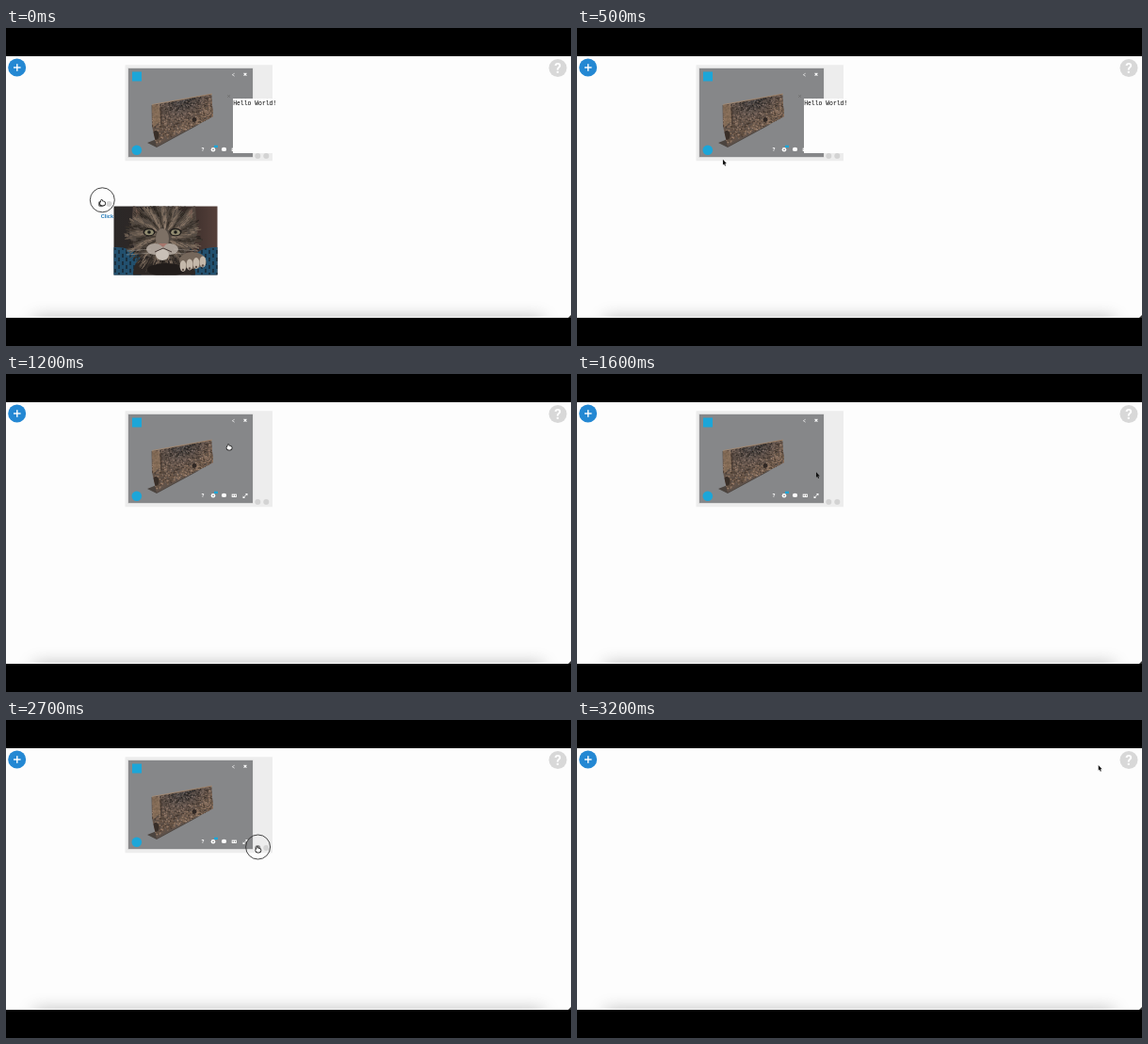
Write an HTML page with a canvas that moves like this. It is 600 px wide and 338 px high and loops after 3300 ms.

```html
<!DOCTYPE html>
<html lang="en">
<head>
<meta charset="utf-8">
<title>Removing board items</title>
<style>
  html, body { margin: 0; width: 100%; height: 100%; overflow: hidden; background: #000; }
  canvas { display: block; width: 600px; height: 338px; }
</style>
</head>
<body>
<canvas id="stage" width="600" height="338"></canvas>
<script>
const LOOP = 3300, STEP = 100;
const PAPER = '#fdfdfd', SKY = '#1ca6d8';
const c = document.getElementById('stage').getContext('2d');

function rect(x, y, w, h, color) {
  c.fillStyle = color;
  c.fillRect(x, y, w, h);
}

function oval(x, y, rx, ry, color) {
  c.fillStyle = color;
  c.beginPath();
  c.ellipse(x, y, rx, ry, 0, 0, 7);
  c.fill();
}

const disc = (x, y, r, color) => oval(x, y, r, r, color);

function trace(points) {
  c.beginPath();
  for (let i = 0; i < points.length; i += 2) c.lineTo(points[i], points[i + 1]);
}

function poly(color, ...points) {
  trace(points);
  c.fillStyle = color;
  c.fill();
}

function line(color, width, ...points) {
  trace(points);
  c.strokeStyle = color;
  c.lineWidth = width;
  c.stroke();
}

function label(text, x, y, font, color, align = 'left') {
  c.font = font;
  c.fillStyle = color;
  c.textAlign = align;
  c.fillText(text, x, y);
}

function cross(x, y, r, color, width) {
  for (const s of [r, -r]) line(color, width, x - r, y - s, x + r, y + s);
}

function clipped(paint, ...points) {
  c.save();
  trace(points);
  c.clip();
  paint();
  c.restore();
}

function random(seed) {
  return () => (seed = seed * 16807 % 2147483647) / 2147483647;
}

function page() {
  rect(0, 0, 600, 338, '#000');
  rect(0, 30, 600, 278, PAPER);
  clipped(() => {
    c.shadowColor = 'rgba(0,0,0,.27)';
    c.shadowBlur = 18;
    rect(30, 308, 540, 30, '#000');
  }, 0, 290, 600, 290, 600, 307, 0, 307);
  poly('#333', 600, 305, 600, 308, 597, 308);

  disc(11.7, 42, 9.5, '#2488d3');
  rect(8, 41.3, 7.6, 1.4, '#fff');
  rect(11.1, 38.2, 1.4, 7.6, '#fff');
  disc(586, 42.5, 9.5, '#d8d8d8');
  label('?', 586, 48, 'bold 15px Roboto, Arial, sans-serif', '#fff', 'center');
}

// Block of weathered stone: u runs along it, v from top to foot
function wall() {
  poly('#4b443f', 150, 122, 160, 118, 206, 102, 160, 127);
  clipped(() => {
    rect(148, 66, 76, 64, '#5f524a');
    const rnd = random(41);
    for (let i = 0; i < 1500; i++) {
      const u = rnd(), v = rnd();
      const cool = Math.exp(-8 * (u - .5) ** 2 - 4 * v * v);
      const light = 22 + rnd() * 34 - cool * 14;
      c.fillStyle = `hsl(${26 - cool * 10} ${20 - cool * 16}% ${light}%)`;
      c.fillRect(155 + u * 65, 81 - u * 11 + v * (43 - u * 19), 1.4, 1.2);
    }
    poly('rgba(150,122,96,.6)', 155, 82, 163, 82, 164, 99, 156, 106);
    oval(159, 114, 3.5, 5, '#382e28');
    disc(200, 97.5, 2.4, '#302824');
  }, 154.5, 82, 218, 70, 220, 94, 160, 126, 155, 104);
  line('#a98a6c', .8, 155, 81.5, 219, 70);
  line('#403229', .8, 164, 84, 165, 102);
}

function viewerIcons() {
  const w = '#fff';
  line(w, .6, 242.7, 48.2, 240.3, 49.7, 242.7, 51.2);
  cross(254, 49.3, 1.4, w, 1.1);
  label('?', 209, 131.4, 'bold 6px Roboto, Arial, sans-serif', w, 'center');
  disc(220, 129.3, 2.3, w);
  disc(220, 129.3, .8, '#777');
  rect(221, 124.7, 4, 2.4, SKY);
  for (const y of [129.6, 128.2]) oval(231.5, y, 2.6, 1.5, w);
  rect(239.7, 127.6, 5.2, 3.4, w);
  for (const x of [241.2, 243.5]) disc(x, 129.2, .7, '#777');
  line(w, .9, 252, 131.5, 256, 127.5);
  for (const s of [1, -1])
    poly(w, 254, 129.5 - 2.4 * s, 254 + 2.4 * s, 129.5 - 2.4 * s, 254 + 2.4 * s, 129.5);
}

function viewer(t) {
  rect(126.5, 39.3, 156.5, 102, '#ededed');
  rect(129.3, 42.3, 133, 95.4, '#d2d2d2');
  rect(130, 43, 132, 94, '#868789');
  wall();
  rect(134, 46.5, 10, 10, SKY);
  disc(138.8, 129.8, 5.3, SKY);
  viewerIcons();
  disc(267.3, 136, 3, t >= 2200 ? '#888' : '#d3d3d3');
  disc(276.3, 136, 3, '#d3d3d3');
}

function note(t) {
  rect(241, 75, 48, 58, PAPER);
  const hover = t >= 800;
  if (hover) rect(234, 69, 5, 7, '#b9b9b9');
  cross(236.6, 72.5, 1.3, hover ? '#111' : '#686868', hover ? 1 : .7);
  label('Hello World!', 241.2, 82, '6.4px "Courier New", "Liberation Mono", monospace', '#000');
}

function fur() {
  const rnd = random(7);
  for (let i = 0; i < 1400; i++) {
    const a = rnd() * 2 * Math.PI, d = 8 + rnd() * 30;
    const dx = Math.cos(a), dy = Math.sin(a);
    const stripe = Math.sin(a * 13 + d * .12);
    const light = 31 + stripe * 13 + rnd() * 12 - d * .25;
    const x = 167 + dx * d, y = 222 + dy * d;
    line(`hsl(28 14% ${light}%)`, 1, x, y, x + dx * 4, y + dy * 4);
  }
}

function cat() {
  disc(101, 187, 3.2, '#777');
  disc(109.5, 187, 3, '#d6d6d6');
  label('Click here', 100.7, 202, 'bold 5.6px Arial, "Liberation Sans", sans-serif', '#2279b8');
  clipped(() => {
    const back = c.createLinearGradient(114, 0, 224, 0);
    back.addColorStop(0, '#2b2827');
    back.addColorStop(.6, '#302624');
    back.addColorStop(1, '#55403a');
    rect(114, 189, 111, 74, back);
    for (const x of [118, 222]) {
      oval(x, 254, 28, 21, '#22506e');
      for (let i = 0; i < 90; i++)
        disc(x - 26 + i % 13 * 4, 235 + Math.floor(i / 13) * 4 + i % 2 * 2, 1, '#172631');
    }
    oval(168, 260, 33, 24, '#2d2724');
    for (const s of [-1, 1]) {
      poly('#51453e', 168 + s * 35, 214, 168 + s * 33, 188, 168 + s * 14, 202);
      poly('#735b50', 168 + s * 30, 205, 168 + s * 30, 192, 168 + s * 19, 201);
    }
    oval(167, 218, 36, 28, '#534a43');
    fur();
    oval(166, 224, 7, 11, '#7d7065');
    for (const s of [-1, 1]) {
      const x = 166 + s * 14;
      oval(x, 217, 6.5, 4.2, '#211e1c');
      oval(x, 217.2, 4.8, 3, '#918b70');
      disc(x, 217, 1.8, '#191a18');
      oval(166 + s * 8, 235, 9, 6, '#aaa097');
      for (const y of [235, 239]) line('#c7beb4', .4, 166 + s * 12, y, 166 + s * 38, y + 2);
    }
    oval(166, 241, 7, 6, '#c9c0b7');
    poly('#a7766c', 162, 229, 171, 229, 167, 233);
    line('#463a36', 1, 158, 238, 167, 234, 176, 238);
    oval(170, 257, 20, 7, '#211c1a');
    oval(198, 247, 14, 9, '#75675b');
    for (let i = 0; i < 4; i++) {
      oval(188 + i * 7, 253 - i * 1.5, 3.4, 6, '#c4b8aa');
      disc(188 + i * 7, 257 - i * 1.5, 1.2, '#5f5149');
    }
  }, 114.5, 189.5, 224.5, 189.5, 224.5, 262.5, 114.5, 262.5);
}

const moves = [
  { from: 200, to: 900, x: 236.5, y: 75 },
  { from: 1300, to: 1900, x: 271.5, y: 134.5 },
  { from: 2000, to: 2200, x: 267.3, y: 135 },
  { from: 2700, to: 3200, x: 553.7, y: 48.5 }
];

function pointerAt(t) {
  let x = 102, y = 182.8;
  for (const m of moves) {
    const p = Math.max(0, Math.min(1, (t - m.from) / (m.to - m.from)));
    const ease = p * p * (3 - 2 * p);
    x += (m.x - x) * ease;
    y += (m.y - y) * ease;
  }
  return [x, y];
}

function pointer(t) {
  const pressed = t < 100 || t === 1100 || t === 2700;
  const hand = t < 100 || (t >= 900 && t < 1400) || (t >= 2200 && t < 2800);
  c.save();
  c.translate(...pointerAt(t));
  if (pressed) {
    c.beginPath();
    c.arc(.3, 0, 13, 0, 7);
    c.strokeStyle = '#333';
    c.lineWidth = .9;
    c.stroke();
  }
  if (hand) {
    oval(.6, 3.6, 3.4, 2.9, '#222');
    oval(-.4, 1.2, 1.3, 2, '#222');
    oval(.6, 3.6, 2.6, 2.1, '#fff');
    oval(-.4, 1.4, .6, 1.5, '#fff');
  } else {
    poly('#111', 0, -.5, 0, 5.2, 1.2, 4.1, 2.1, 6.2, 3.1, 5.8, 2.2, 3.8, 3.9, 3.7);
  }
  c.restore();
}

function draw(now) {
  const t = Math.floor(now % LOOP / STEP) * STEP;
  page();
  if (t < 2800) viewer(t);
  if (t < 1200) note(t);
  if (t < 100) cat();
  pointer(t);
}

let origin;
function tick(now) {
  origin ??= now;
  draw(now - origin);
  requestAnimationFrame(tick);
}
draw(0);
requestAnimationFrame(tick);
</script>
</body>
</html>
```
